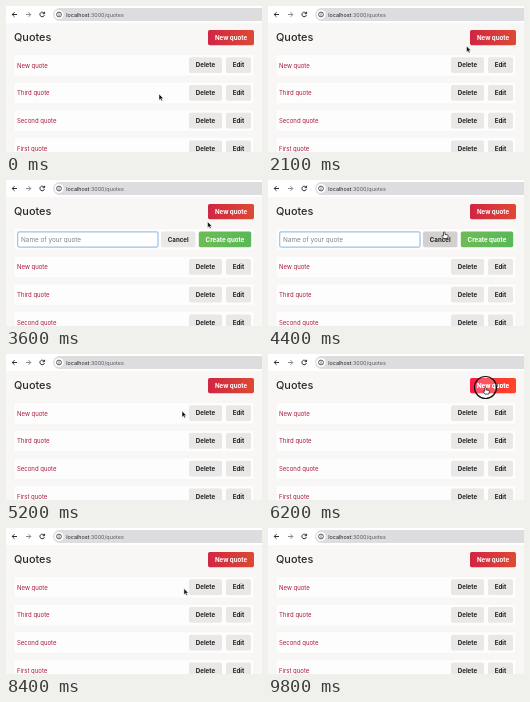
An HTML page for the animation above (9900 ms loop, 256 by 146 pixels).

```html
<!DOCTYPE html>
<html lang="en">
<head>
<meta charset="utf-8">
<style>
  html, body { margin: 0; width: 100%; height: 100%; overflow: hidden; }
  svg { display: block; width: 100vw; height: 100vh; font: 6px Inter, sans-serif; }
  .bold { font-size: 6.15px; font-weight: 700; text-anchor: middle; fill: #222; }
  .light rect { fill: #eae7e7; }
  .light.hover rect { fill: #d3d0d0; }
  .primary rect { fill: url(#red); }
  .secondary rect { fill: url(#green); }
  .primary text, .secondary text { fill: #fff; }
  .primary.hover { filter: saturate(1.4) brightness(1.15); }
  .card { fill: #fdfdfd; stroke: #f1efed; stroke-width: .4; }
  .link { fill: #ab1a3c; }
  .icon { fill: none; stroke: #2c2c2c; stroke-width: 1; }
  #field { fill: #fff; stroke: #dedbdb; stroke-width: .7; }
  #field.focus { stroke: #9cc4e8; stroke-width: 1.2; }
</style>
</head>
<body>
<svg viewBox="0 0 256 146" preserveAspectRatio="none">
  <defs>
    <linearGradient id="red"><stop stop-color="#d02643"/><stop offset="1" stop-color="#dd4934"/></linearGradient>
    <linearGradient id="green"><stop stop-color="#6dbc55"/><stop offset="1" stop-color="#59b858"/></linearGradient>
  </defs>
  <rect width="256" height="146" fill="#f8f7f5"/>
  <rect width="256" height="17" fill="#fff"/>
  <rect x="47" y="2" width="220" height="13" rx="6.5" fill="#dddddf"/>
  <g class="icon">
    <path d="M11 8.5H6.3M8.5 6.2L6.2 8.5l2.3 2.3"/>
    <path d="M20 8.5h4.7M22.5 6.2l2.3 2.3-2.3 2.3" stroke="#888"/>
    <path d="M38.2 7.3A2.3 2.3 0 1 0 38.4 9.2M38.6 5.8v1.9h-1.9"/>
    <circle cx="53" cy="8.5" r="4.6" fill="#fff" stroke="none"/>
    <circle cx="53" cy="8.5" r="2.4" stroke-width=".8"/>
    <path d="M53 8.2v1.6M53 6.9v.7" stroke-width=".7"/>
  </g>
  <text x="60.3" y="10.5" font-size="5.4" fill="#1c1c1e">localhost<tspan fill="#58595c">:3000/quotes</tspan></text>
  <text x="8" y="34.7" font-size="10.9" font-weight="500" fill="#292828">Quotes</text>
  <g id="page"></g>
  <g id="form">
    <rect class="card" x="8" y="48.5" width="240" height="21.5" rx="1.5"/>
    <rect id="field" x="11.7" y="51.8" width="140.3" height="15.3" rx="1.5"/>
    <text x="15" y="61.8" font-size="6.4" fill="#858383">Name of your quote</text>
    <path id="caret" d="M15.3 55.7v7.5" stroke="#222" stroke-width=".6"/>
  </g>
  <g id="list"></g>
  <circle id="ring" r="11" fill="#fff" fill-opacity=".2" stroke="#111" stroke-width="1.2"/>
  <g id="cursor" stroke-linejoin="round">
    <path id="arrow" d="M0 0V6.2L1.5 4.9 2.5 7.1 3.6 6.6 2.6 4.5H4.5Z" fill="#111" stroke="#fff" stroke-width=".5"/>
    <path id="hand" d="M-.8.4Q0-.5.7.4V2.4L3.3 3Q4 3.2 3.9 4L3.3 6.6H-.6L-2.4 4.2Q-2.4 3.1-.8 3.8Z" fill="#fff" stroke="#111" stroke-width=".7"/>
  </g>
</svg>
<script>
const DURATION = 9900, ROW = 27.7;
const OPEN = [[2900, 5200], [6400, 7600]];
const CLICKS = [[2600, 2900], [4900, 5200], [6200, 6400], [7300, 7600]];
// time, x, y
const PATH = [
  [0, 153, 88], [1100, 153, 88], [2100, 198.5, 40], [2500, 215.3, 36],
  [3200, 215.3, 36], [4200, 176.3, 52], [4400, 176.3, 52], [4700, 176, 57],
  [5300, 176, 57], [6100, 217.5, 33.5], [6400, 217.5, 33.5], [7100, 175, 63],
  [8300, 175, 63], [9200, 260, -10], [DURATION, 260, -10]
];

const $ = id => document.getElementById(id);
const buttons = [];

function add(parent, tag, attrs, text = '') {
  const el = document.createElementNS('http://www.w3.org/2000/svg', tag);
  for (const key in attrs) el.setAttribute(key, attrs[key]);
  el.textContent = text;
  return parent.appendChild(el);
}

function button(parent, kind, label, x, y, w, h = 15.7) {
  const el = add(parent, 'g', { class: kind });
  add(el, 'rect', { x, y, width: w, height: h, rx: 1.7 });
  add(el, 'text', { class: 'bold', x: x + w / 2, y: y + h / 2 + 2.3 }, label);
  buttons.push({ el, parent, x, y, w, h });
}

button($('page'), 'primary', 'New quote', 202, 24, 46, 15.3);
button($('form'), 'light', 'Cancel', 155, 51.6, 34.5);
button($('form'), 'secondary', 'Create quote', 192.8, 51.6, 52.4);
['New', 'Third', 'Second', 'First'].forEach((name, i) => {
  const y = 48.5 + i * ROW, list = $('list');
  add(list, 'rect', { class: 'card', x: 8, y, width: 240, height: 21.5, rx: 1.5 });
  add(list, 'text', { class: 'link', x: 11, y: y + 13 }, name + ' quote');
  button(list, 'light', 'Delete', 183, y + 2.8, 33);
  button(list, 'light', 'Edit', 220, y + 2.8, 25);
});

const during = (spans, t) => spans.find(([from, to]) => t >= from && t < to);
const show = (id, on) => $(id).setAttribute('visibility', on ? 'visible' : 'hidden');

function position(t) {
  const i = PATH.findIndex(stop => stop[0] > t);
  const [t0, x0, y0] = PATH[i - 1], [t1, x1, y1] = PATH[i];
  const p = (t - t0) / (t1 - t0), ease = p * p * (3 - 2 * p);
  return [x0 + (x1 - x0) * ease, y0 + (y1 - y0) * ease];
}

function render(now) {
  const t = Math.floor(now % DURATION / 100) * 100;
  const open = during(OPEN, t), age = open ? t - open[0] : 0;
  const [x, y] = position(t), shift = open ? ROW : 0;

  $('form').style.display = open ? '' : 'none';
  $('list').setAttribute('transform', `translate(0 ${shift})`);
  $('field').classList.toggle('focus', age >= 100);
  $('caret').style.display = age % 1000 < 500 ? '' : 'none';

  let over = false;
  for (const b of buttons) {
    const top = b.y + (b.parent.id === 'list' ? shift : 0);
    const hit = (b.parent.id !== 'form' || open) &&
      x > b.x && x < b.x + b.w && y > top && y < top + b.h;
    b.el.classList.toggle('hover', !!hit);
    over = over || hit;
  }
  for (const id of ['cursor', 'ring']) $(id).setAttribute('transform', `translate(${x} ${y})`);
  show('hand', over);
  show('arrow', !over);
  show('ring', during(CLICKS, t));
}

let start;
function animate(now) {
  start ??= now;
  render(Math.max(0, now - start));
  requestAnimationFrame(animate);
}
requestAnimationFrame(animate);
</script>
</body>
</html>
```
